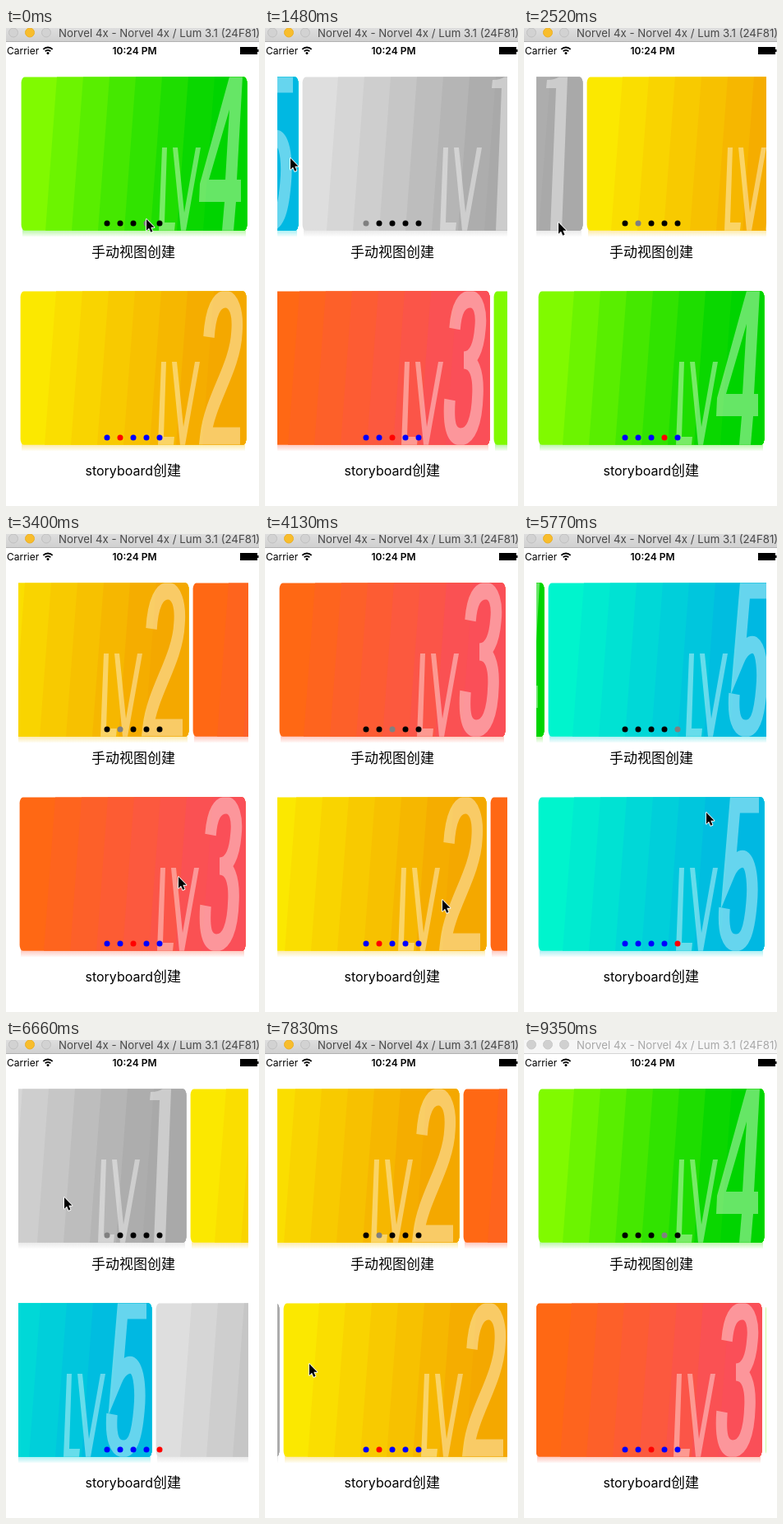
Recreate the animation shown at these times as an HTML page with a canvas. Size 308 by 580 pixels, loop 9390 ms.

```html
<!DOCTYPE html>
<html lang="zh">
<head>
<meta charset="utf-8">
<title>Carousels</title>
<style>
  html, body { margin: 0; width: 100%; height: 100%; overflow: hidden; background: #fff; }
  canvas { display: block; }
</style>
</head>
<body>
<canvas id="stage" width="308" height="580"></canvas>
<script>
const ctx = document.getElementById('stage').getContext('2d');
const LOOP = 9390, STEP = 147.74, LAST = 9350;
const PAGE = 280, CARD_W = 276, CARD_H = 187;
const TALL = 1.55; // the lettering is stretched, so horizontal strokes are thicker
const LATIN = 'Inter, Roboto, sans-serif';
const HAN = '"Noto Sans CJK SC", "Noto Sans CJK", sans-serif';

// Each card: gradient ends and the shape of its numeral.
const cards = [
  { from: [222, 222, 222], to: [169, 169, 169], fill: true,
    digit: 'M247 0H257L250 187H236L243 14H231L232 4Q242 4 247 0Z' },
  { from: [251, 232, 0], to: [244, 168, 0],
    digit: 'M230 56C232 24 240 10 250 10C260 10 266 26 264 50C262 94 231 132 226 176H268' },
  { from: [255, 104, 20], to: [250, 79, 88],
    digit: 'M233 46C235 20 242 10 252 10C262 10 266 27 264 45C262 70 255 84 244 84' +
           'C256 84 262 100 261 125C260 160 252 177 240 177C228 177 225 160 227 132' },
  { from: [128, 250, 0], to: [0, 212, 0], fill: true,
    digit: 'M254 0H270L263 125H268V152H262L259 187H245L248 152H217L218 130Z' +
           'M254 40L229 125H249Z' },
  { from: [0, 244, 205], to: [0, 184, 226],
    digit: 'M269 9H240L233 92C238 80 246 73 252 76C261 82 262 110 260 130' +
           'C257 165 251 177 241 177C230 177 225 163 227 135' }
];
for (const card of cards) {
  card.path = new Path2D();
  card.path.addPath(new Path2D(card.digit), { a: 1, d: 1 / TALL });
}
const levelMark = new Path2D(
  'M172 86h6L175 177H188L187 187H168ZM185 86h6L199 165L213 86h6L201 187h-6Z');
const arrow = new Path2D('M0 0V15.5L3.6 12.2L6.2 18L8.8 16.9L6.3 11.2H11.2Z');

const flick = p => 1 - (1 - p) ** 3;
const glide = p => p * p * (3 - 2 * p);

// Moves: [start ms, duration ms, target page, easing]
const carousels = [
  { y: 59, first: 2, dot: '#000', current: '#808080', moves: [
    [-420, 500, 3, flick], [280, 600, 4, flick], [1155, 600, 5, flick],
    [2300, 300, 6, glide], [3300, 300, 7, glide], [4400, 300, 8, glide],
    [5500, 300, 9, glide], [6050, 480, 10, flick], [6548, 300, 11, glide],
    [7744, 300, 12, glide], [8850, 300, 13, glide]] },
  { y: 319, first: 1, dot: '#00f', current: '#f00', moves: [
    [330, 300, 2, glide], [1430, 300, 3, glide], [2894, 600, 2, flick],
    [3650, 600, 1, flick], [4502, 600, 0, flick], [5150, 600, -1, flick],
    [6516, 300, 0, glide], [7387, 600, 1, flick], [8240, 300, 2, glide],
    [9332, 300, 3, glide]] }
];

// Pointer stops: [ms, x, y]
const pointer = [
  [0, 170, 231], [280, 226, 200], [600, 80, 176], [1130, 215, 165], [1477, 30, 157],
  [2066, 13, 166], [2300, 13, 166], [2890, 110, 400], [3390, 209, 415], [3650, 112, 436],
  [4080, 228, 444], [4500, 125, 444], [4870, 233, 447], [5150, 100, 430], [5560, 220, 420],
  [6050, 222, 196], [6640, 70, 190], [7380, 205, 384], [7825, 53, 392], [8400, 84, 424],
  [9160, 2, 566]
];

const mod = n => ((n % 5) + 5) % 5;

function pageAt(carousel, t) {
  let page = carousel.first;
  for (const [start, duration, target, ease] of carousel.moves) {
    if (t < start) break;
    page += (target - page) * ease(Math.min(1, (t - start) / duration));
  }
  return page;
}

function pointerAt(t) {
  const i = pointer.findIndex(stop => stop[0] >= t);
  if (i < 0) return pointer[pointer.length - 1].slice(1);
  if (i === 0) return pointer[0].slice(1);
  const [t0, x0, y0] = pointer[i - 1], [t1, x1, y1] = pointer[i];
  const p = glide((t - t0) / (t1 - t0));
  return [x0 + (x1 - x0) * p, y0 + (y1 - y0) * p];
}

function text(string, x, y, font, color = '#000', align = 'left') {
  ctx.font = font;
  ctx.fillStyle = color;
  ctx.textAlign = align;
  ctx.fillText(string, x, y);
}

function circle(x, y, r, fill, border) {
  ctx.beginPath();
  ctx.arc(x, y, r, 0, 7);
  ctx.fillStyle = fill;
  ctx.fill();
  if (border) {
    ctx.strokeStyle = border;
    ctx.lineWidth = 1;
    ctx.stroke();
  }
}

function drawCard({ from, to, fill, path }, x, y) {
  const color = (p, alpha = 1) =>
    `rgba(${from.map((v, i) => Math.round(v + (to[i] - v) * p))},${alpha})`;
  ctx.save();
  ctx.translate(x, y);

  const shadow = ctx.createLinearGradient(0, CARD_H - 2, 0, CARD_H + 8);
  shadow.addColorStop(0, color(.6, .4));
  shadow.addColorStop(1, color(.6, 0));
  ctx.fillStyle = shadow;
  ctx.fillRect(2, CARD_H - 4, CARD_W - 4, 12);

  ctx.beginPath();
  ctx.roundRect(.6, .6, CARD_W - 1.2, CARD_H - .8, { x: 4, y: 7 });
  ctx.clip();
  ctx.fillStyle = color(0);
  ctx.fillRect(0, 0, CARD_W, CARD_H);
  for (let i = 1; i < 8; i++) {
    const left = 12 + i * 32;
    ctx.fillStyle = color(Math.min(1, i / 6.5));
    ctx.beginPath();
    ctx.moveTo(left, 0);
    ctx.lineTo(300, 0);
    ctx.lineTo(300, CARD_H);
    ctx.lineTo(left - 14, CARD_H);
    ctx.fill();
  }
  ctx.fillStyle = ctx.strokeStyle = 'rgba(255,255,255,.4)';
  ctx.fill(levelMark);
  ctx.scale(1, TALL);
  ctx.lineWidth = 13.5;
  if (fill) ctx.fill(path, 'evenodd');
  else ctx.stroke(path);
  ctx.restore();
}

function drawCarousel(carousel, t) {
  const page = pageAt(carousel, t), base = Math.floor(page);
  ctx.save();
  ctx.beginPath();
  ctx.rect(15, carousel.y, PAGE, 194);
  ctx.clip();
  for (let n = base - 1; n <= base + 1; n++)
    drawCard(cards[mod(n)], 17 + Math.round((n - page) * PAGE), carousel.y);
  ctx.restore();
  for (let i = 0; i < 5; i++)
    circle(123 + 16 * i, carousel.y + 178, 3.5,
      i === mod(Math.round(page)) ? carousel.current : carousel.dot);
}

function drawTitleBar(active) {
  const shade = ctx.createLinearGradient(0, 0, 0, 16);
  shade.addColorStop(0, active ? '#dedede' : '#f6f6f6');
  shade.addColorStop(1, active ? '#d0d0d0' : '#f6f6f6');
  ctx.fillStyle = shade;
  ctx.fillRect(0, 0, 308, 16);
  ctx.fillStyle = active ? '#b2b2b2' : '#d4d4d4';
  ctx.fillRect(0, 16, 308, 1);
  for (let i = 0; i < 3; i++) {
    const lit = active && i === 1;
    circle(9 + 20 * i, 5.5, 5.5, lit ? '#f8bd2c' : active ? '#d2d2d2' : '#d0d0d0',
      lit ? '#ebb02a' : active ? '#c0c0c0' : '#cacaca');
  }
  text('Norvel 4x - Norvel 4x / Lum 3.1 (24F81)', 64, 11, `13.25px ${LATIN}`,
    active ? '#484848' : '#a8a8a8');
}

function drawStatusBar() {
  text('Carrier', 1, 32, `12px ${LATIN}`);
  text('10:24 PM', 156.5, 32, `600 12px ${LATIN}`, '#000', 'center');
  circle(51, 30.5, 1.5, '#000');
  ctx.strokeStyle = '#000';
  ctx.lineWidth = 1.8;
  for (const r of [4.6, 8]) {
    ctx.beginPath();
    ctx.arc(51, 31.5, r, -Math.PI * .75, -Math.PI * .25);
    ctx.stroke();
  }
  ctx.fillStyle = '#000';
  ctx.fillRect(285, 23, 21, 9);
  ctx.fillRect(306, 26, 1.5, 3);
}

function drawPointer(t) {
  const [x, y] = pointerAt(t);
  ctx.save();
  ctx.translate(Math.round(x) + 1, Math.round(y) + 1);
  ctx.scale(.85, .88);
  ctx.lineJoin = 'round';
  ctx.strokeStyle = '#fff';
  ctx.lineWidth = 2;
  ctx.stroke(arrow);
  ctx.fillStyle = '#000';
  ctx.fill(arrow);
  ctx.restore();
}

function draw(now) {
  const time = now % LOOP;
  const active = time < LAST;
  const t = active ? Math.min(62, Math.floor((time + 4) / STEP)) * STEP : LAST;
  ctx.fillStyle = '#fff';
  ctx.fillRect(0, 0, 308, 580);
  drawTitleBar(active);
  drawStatusBar();
  carousels.forEach(carousel => drawCarousel(carousel, t));
  text('手动视图创建', 155, 278, `17px ${HAN}`, '#000', 'center');
  text('storyboard', 179, 543, `16px ${LATIN}`, '#000', 'right');
  text('创建', 179, 543, `17px ${HAN}`);
  if (active) drawPointer(t);
}

const began = performance.now();
function tick() {
  draw(performance.now() - began);
  requestAnimationFrame(tick);
}
tick();
</script>
</body>
</html>
```
